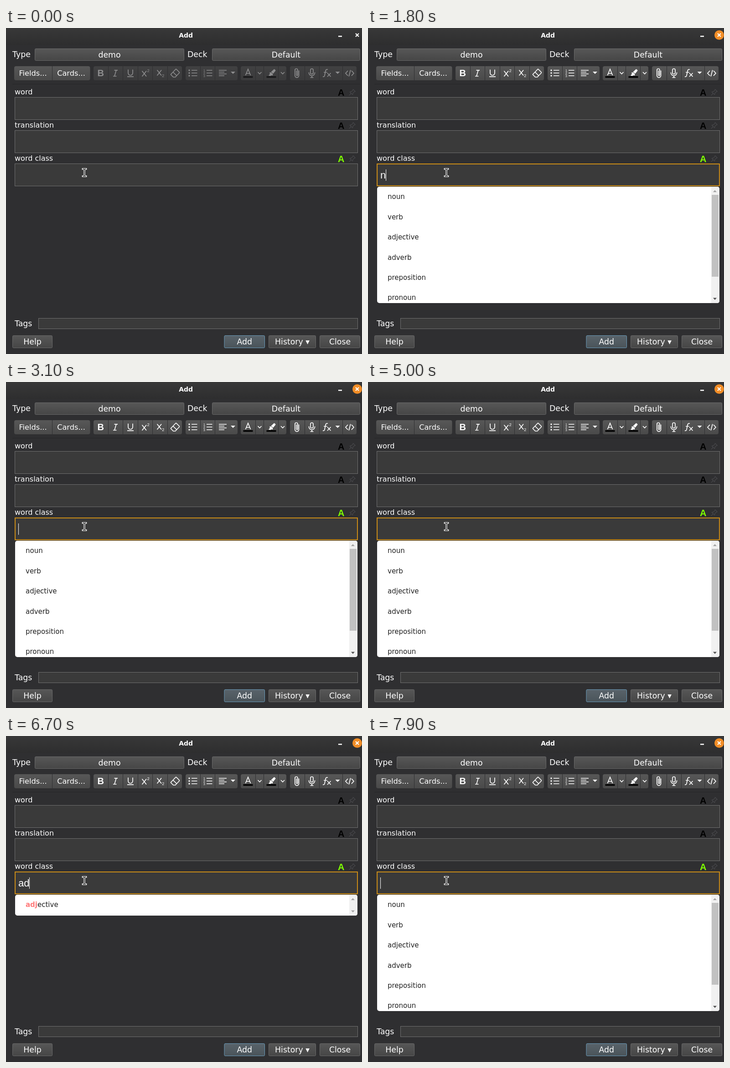
An HTML page that plays this animation: 781 by 717 pixels, repeating every 8 s.

```html
<!DOCTYPE html>
<html lang="en">
<head>
<meta charset="utf-8">
<title>Add</title>
<style>
html, body { margin: 0; width: 100%; height: 100%; overflow: hidden; background: #2f2f31; }
svg { display: block; width: 781px; height: 717px; font-family: "DejaVu Sans", sans-serif; fill: #fff; }
.ui { font-size: 17.33px; }
.tool { font-size: 16.2px; }
.label { font-size: 16px; }
.title { font-size: 14px; font-weight: bold; }
.badge, .typed, .glyph { font-family: "Liberation Sans", Arial, sans-serif; }
.badge { font-size: 20px; font-weight: bold; }
.typed { font-size: 22px; }
.line { fill: none; stroke: #fff; stroke-width: 1.7; }
.item { font-size: 15px; fill: #212121; }
.hit { fill: #ff7a7a; font-weight: bold; }
.mid { text-anchor: middle; }
</style>
</head>
<body>
<svg id="stage" viewBox="0 0 781 717" xmlns="http://www.w3.org/2000/svg"></svg>
<script>
const LOOP = 8000;
const ROW = 44.4;
const WORDS = ['noun', 'verb', 'adjective', 'adverb', 'preposition', 'pronoun'];
const CARET_X = { '': 27, n: 39, no: 51, a: 39, ad: 51, adj: 57 };

// start time, typed text, caret visible, list filter (null = closed)
const STEPS = [
  [300, '', 0, null], [400, '', 1, ''], [1000, '', 0, ''], [1600, '', 1, ''],
  [1800, 'n', 1, ''], [1900, 'n', 1, 'n'], [2000, 'no', 1, 'no'], [2600, 'no', 0, 'no'],
  [2800, 'n', 0, 'n'], [3000, '', 0, 'n'], [3100, '', 1, ''], [3800, '', 0, ''],
  [4400, '', 1, ''], [5000, '', 0, ''], [5100, 'a', 1, 'a'], [5300, 'ad', 1, 'ad'],
  [5500, 'adj', 1, 'adj'], [6100, 'adj', 0, 'adj'], [6700, 'ad', 1, 'adj'],
  [6800, 'ad', 1, 'ad'], [7100, 'a', 1, 'a'], [7300, '', 0, 'a'],
  [7400, '', 0, ''], [7900, '', 1, '']
];

const rect = (x, y, w, h, fill, extra = '') =>
  `<rect x="${x}" y="${y}" width="${w}" height="${h}" fill="${fill}" ${extra}/>`;
const text = (x, y, cls, s, extra = '') => `<text x="${x}" y="${y}" class="${cls}" ${extra}>${s}</text>`;
const line = (d, extra = '') => `<path class="line" d="${d}" ${extra}/>`;
const solid = (d, fill = '#fff') => `<path d="${d}" fill="${fill}"/>`;

const button = (x, y, w, h, label, grad = 'face', edge = '#696969') =>
  rect(x + .5, y + .5, w - 1, h - 1, `url(#${grad})`, `rx="2" stroke="${edge}"`) +
  text(x + w / 2, y + h / 2 + 6, 'ui mid', label);

// A toolbar button; ends says which sides are rounded
function tool(x, w, ends = '') {
  const l = ends.includes('l') ? 4 : 0, r = ends.includes('r') ? 4 : 0;
  return `<path fill="url(#tool)" d="M${x + l} 84h${w - l - r}q${r} 0 ${r} ${r}v${31 - 2 * r}` +
    `q0 ${r} ${-r} ${r}h${l + r - w}q${-l} 0 ${-l} ${-l}v${2 * l - 31}q0 ${-l} ${l} ${-l}z"/>`;
}

const bars = (x, w, ys) => line(ys.map(y => `M${x} ${y}h${w}`).join(''));
const chevron = x => line(`M${x - 4} 97l4 4 4-4`, 'stroke-width="1.6"');
const triangle = x => solid(`M${x - 5} 96h10l-5 5z`);

function toolbar() {
  const faces = [
    [192, 32, 'l'], [225, 31], [257, 32], [290, 31], [322, 32], [355, 31, 'r'],
    [394, 32, 'l'], [427, 31], [459, 49, 'r'],
    [515, 32, 'l'], [548, 17], [566, 31], [598, 17, 'r'],
    [623, 32, 'l'], [656, 31], [688, 50], [739, 30, 'r']
  ].map(f => tool(...f)).join('');
  const small = (x, y, s, size) => text(x, y, 'glyph', s, `font-size="${size}"`);
  return faces +
    text(200.5, 106, 'badge', 'B') +
    line('M237.5 92.8h7.5M235 106h7.5M241.8 93l-3.8 13') +
    line('M268 91.5v7.5a5 5 0 0 0 10 0v-7.5M266 107.2h14') +
    line('M298.5 94.5l9.5 12m0-12l-9.5 12') + small(309.5, 97, '2', 9.5) +
    line('M331.5 92.5l9.5 12m0-12l-9.5 12') + small(342, 108, '2', 9.5) +
    line('M362 101.5L372 91q1-1 2 0l6 6q1 1 0 2l-8.5 9h-4.5l-5-5q-.8-.8 0-1.5zM366.5 97l8 8', 'stroke-width="1.4"') +
    [93, 99, 105].map(y => `<circle cx="402" cy="${y}" r="1.7"/>`).join('') + bars(407, 12.5, [93, 99, 105]) +
    [1, 2, 3].map(n => small(433, 89.5 + n * 6, n, 7)).join('') + bars(440, 12.5, [93, 99, 105]) +
    bars(467, 17, [93, 101]) + bars(467, 12, [97, 105]) + triangle(498) +
    line('M525.5 104l5.5-13.5 5.5 13.5M527.5 100h7', 'stroke-width="2"') + rect(520.5, 106, 21, 3.5, '#000') + chevron(556.5) +
    solid('M576 104.5l3-3.5-1-3 3.5-.5 4 4-.5 3-3-.5-2 1.5zM581.5 96.500l6-5.500q1-1 2 0l1.500 1.500q1 1 0 2l-5 6z') +
    rect(571.5, 106, 21, 3.5, '#000') + chevron(607) +
    line('M642.500 93.500v11a4.300 4.300 0 0 1-8.600 0v-12a3 3 0 0 1 6 0v11a1.300 1.300 0 0 1-2.600 0v-10', 'stroke-width="1.5"') +
    line('M668 92.500a3 3 0 0 1 6 0v6a3 3 0 0 1-6 0zM664.500 97.500v1a6.500 6.500 0 0 0 13 0v-1M671 105v4M667.500 109h7', 'stroke-width="1.5"') +
    line('M706 91.500q-4-1.500-5 3l-2 10q-.8 3.500-4 2.500M697 97.500h7.500M705 99l7.500 8m0-8l-7.500 8') + triangle(727.500) +
    line('M750 94l-5 5.500 5 5.500M758 94l5 5.500-5 5.500M755.800 92.500l-3.600 14', 'stroke-width="1.500"');
}

const PIN = 'M10 1.3 14.8 6c-.8.8-1.7.6-2 .5L9.2 10.1c.4 1.5.2 2.5-.5 3.2L2.8 7.3c.7-.7 1.7-.9 3.2-.5' +
  'L9.500 3.200C9.400 2.900 9.200 2 10 1.300zM5.700 10.300 1.300 14.700';

const field = (name, i) => {
  const y = 73 * i;
  return text(19, 146 + y, 'label', name) +
    text(728, 148.5 + y, 'badge', 'A', `style="fill:${i === 2 ? '#7fff00' : '#000'}"`) +
    `<path transform="translate(751.5 ${133.5 + y})" d="${PIN}" fill="none" stroke="#56565a"/>` +
    rect(19.5, 152.5 + y, 752, 49, '#3a3a3a', 'stroke="#707070"');
};

const grad = (id, a, b) =>
  `<linearGradient id="${id}" x2="0" y2="1"><stop stop-color="${a}"/><stop offset="1" stop-color="${b}"/></linearGradient>`;

const beam = 'M168.500 310h2.500l1 1 1-1h2.500M172 311v14M168.500 326h2.500l1-1 1 1h2.500';

const stage = document.getElementById('stage');
stage.innerHTML =
  '<defs>' + grad('bar', '#383838', '#2e2e2f') + grad('face', '#575757', '#464646') +
  grad('main', '#59636a', '#4a545a') +
  '<linearGradient id="tool" gradientUnits="userSpaceOnUse" x1="0" y1="84" x2="0" y2="115">' +
  '<stop stop-color="#575757"/><stop offset="1" stop-color="#4a4a4a"/></linearGradient></defs>' +
  rect(0, 0, 781, 717, '#2f2f31') + rect(0, 0, 781, 37, 'url(#bar)') +
  text(394.7, 21, 'title mid', 'Add') + rect(729, 17, 8, 2.5, '#fff') +
  '<circle id="close" cx="770.5" cy="15.5" r="10.5" fill="#f18d26"/>' +
  line('M767 12l7 7m0-7l-7 7', 'style="stroke-width:2.2"') +
  text(14, 64, 'ui', 'Type') + button(63, 45, 328, 27, 'demo') +
  text(398, 64, 'ui', 'Deck') + button(452, 45, 325, 27, 'Default') +
  tool(18, 83, 'l') + tool(102, 82.5, 'r') +
  text(59, 105, 'tool mid', 'Fields...') + text(143, 105, 'tool mid', 'Cards...') +
  `<g id="tools">${toolbar()}</g>` + rect(14, 123, 763, 1, '#262628') +
  ['word', 'translation', 'word class'].map(field).join('') +
  rect(20, 299, 751, 48, 'none', 'id="focus" stroke="#c98b17" stroke-width="2"') +
  text(27, 331, 'typed', '', 'id="typed"') + rect(27, 311, 1, 25, '#fff', 'id="caret"') +
  '<g id="list"></g>' +
  `<path d="${beam}" fill="none" stroke="#fff" stroke-width="3.6" stroke-linecap="square"/>` +
  `<path d="${beam}" fill="none" stroke="#1c1c1c" stroke-width="1.4"/>` +
  text(19, 655.5, 'ui', 'Tags') + rect(71.5, 638.5, 700, 23, '#3a3a3a', 'stroke="#707070"') +
  button(14, 676, 88, 28, 'Help') + button(478.5, 676, 89.5, 28, 'Add', 'main', '#6a9cbb') +
  button(576, 676, 104, 28, 'History ▾') + button(688, 676, 89, 28, 'Close');

const [closeDot, tools, focus, typed, caret, list] =
  ['close', 'tools', 'focus', 'typed', 'caret', 'list'].map(id => document.getElementById(id));
const show = (el, on) => el.setAttribute('visibility', on ? 'visible' : 'hidden');

function listMarkup(query) {
  if (query === null) return '';
  const rows = WORDS.filter(w => w.startsWith(query));
  const full = rows.length === WORDS.length;
  const h = full ? 256 : Math.round(rows.length * ROW + 1.8);
  const end = 349 + h;
  return rect(20, 349, 751, h, '#fff', 'rx="5"') +
    `<path fill="#f1f1f1" d="M753 349h13q5 0 5 5v${h - 10}q0 5-5 5h-13z"/>` +
    (full ? rect(754, 367, 15, 180, '#c1c1c1') : '') +
    solid('M757 361h8l-4-4.500z', '#a3a3a3') +
    solid(`M757 ${end - 11.5}h8l-4 4.5z`, full ? '#505050' : '#a3a3a3') +
    rows.map((w, i) => text(43, Math.round(376.4 + i * ROW), 'item',
      `<tspan class="hit">${query}</tspan>${w.slice(query.length)}`)).join('');
}

let shown;
function draw(ms) {
  const step = STEPS.filter(s => s[0] <= ms).pop();
  if (step === shown) return;
  shown = step;
  const [, value, blink, query] = step || [0, '', 0, null];
  const active = Boolean(step);
  show(closeDot, active);
  show(focus, active);
  tools.setAttribute('opacity', active ? 1 : .45);
  typed.textContent = value;
  caret.setAttribute('x', CARET_X[value]);
  show(caret, blink);
  list.innerHTML = listMarkup(query);
}

shown = null;
const start = performance.now();
function tick() {
  draw((performance.now() - start) % LOOP);
  requestAnimationFrame(tick);
}
tick();
</script>
</body>
</html>
```
